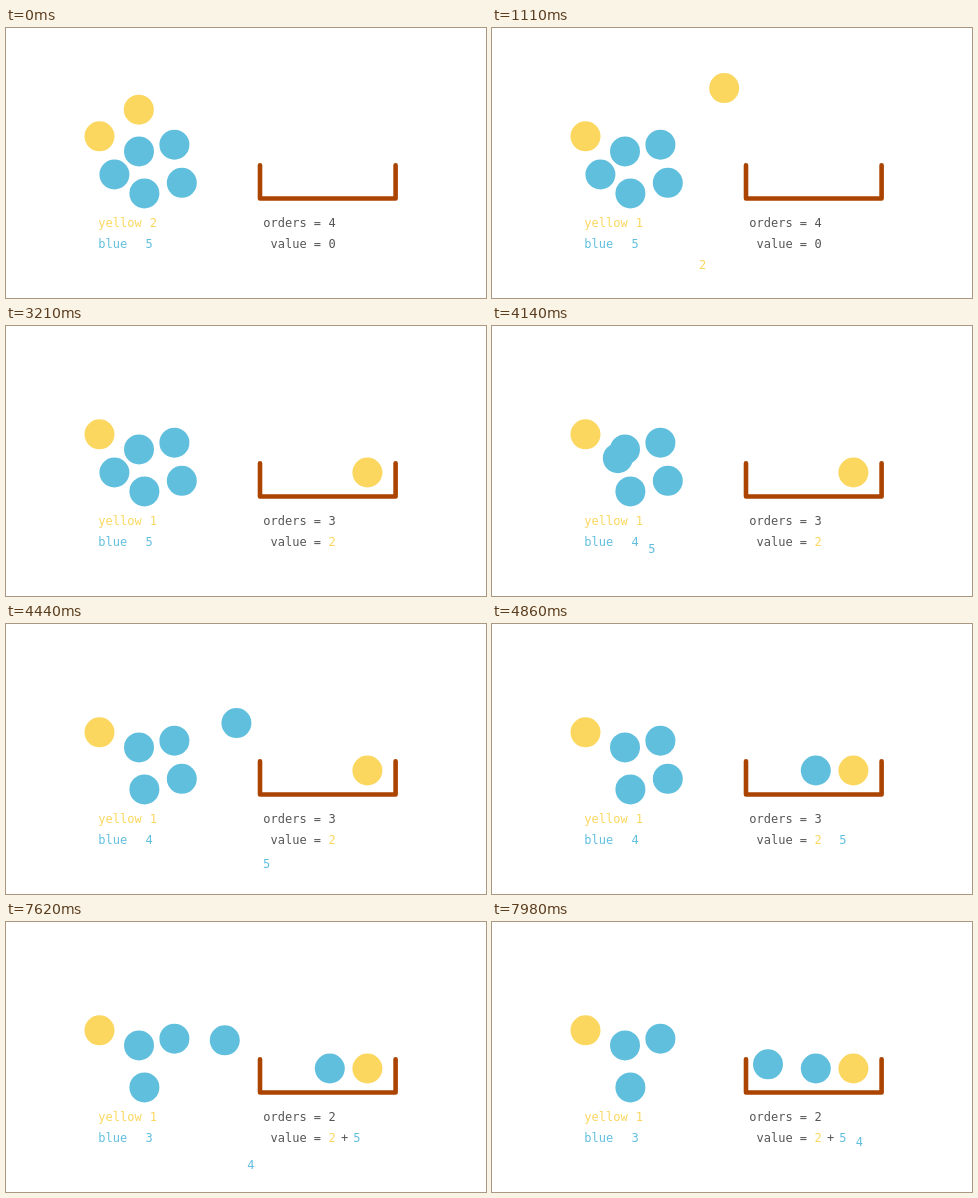
Write an HTML page with a canvas that moves like this. It is 480 by 270 pixels and loops after 8000 ms.

```html
<!DOCTYPE html>
<html lang="en">
<head>
<meta charset="utf-8">
<style>
  html, body { margin: 0; width: 100%; height: 100%; overflow: hidden; background: #fff; }
  canvas { display: block; }
</style>
</head>
<body>
<canvas id="stage" width="480" height="270"></canvas>
<script>
const ctx = document.getElementById('stage').getContext('2d');
const YELLOW = '#fbd75f', BLUE = '#61bfde', BROWN = '#aa4400', INK = '#555';
const LOOP = 8000, MOVE = 900, COUNT_DELAY = 55;
const ROW1 = 198.7, ROW2 = 220.2;

const restingBalls = [
  [93.5, 108.3, YELLOW], [133, 123.4, BLUE], [168.4, 116.7, BLUE], [138.4, 165.4, BLUE]
];

// Each picked ball arcs into the box while its value digit arcs into the sum.
const picks = [
  { start: 720, color: YELLOW, digit: '2',
    ball: { from: [132.8, 81.7], to: [361.4, 146.5], bulge: -51 },
    label: { from: [147.4, ROW1], to: [326, ROW2], bulge: 37 } },
  { start: 3960, color: BLUE, digit: '5',
    ball: { from: [108.4, 146.5], to: [323.8, 146.5], bulge: -48.3 },
    label: { from: [143, ROW2], to: [350.8, ROW2], bulge: 24 } },
  { start: 7200, color: BLUE, digit: '4',
    ball: { from: [175.8, 154.8], to: [280, 146.5], bulge: -33.5 },
    label: { from: [143, ROW2], to: [375.6, ROW2], bulge: 27 } }
];

const clamp = v => Math.min(1, Math.max(0, v));
const progress = (t, start, length) => clamp((t - start) / length);
const easeInOut = p => p < 0.5 ? 2 * p * p : 1 - 2 * (1 - p) ** 2;

// Point on a parabola whose bulge stands perpendicular to the chord.
function arcPoint({ from, to, bulge }, u) {
  const dx = to[0] - from[0], dy = to[1] - from[1];
  const offset = bulge * 4 * u * (1 - u) / Math.hypot(dx, dy);
  return [from[0] + dx * u - dy * offset, from[1] + dy * u + dx * offset];
}

function ball(x, y, color) {
  ctx.fillStyle = color;
  ctx.beginPath();
  ctx.arc(x, y, 15, 0, 2 * Math.PI);
  ctx.fill();
}

function text(str, x, y, color, align = 'center', alpha = 1) {
  ctx.globalAlpha = alpha;
  ctx.fillStyle = color;
  ctx.textAlign = align;
  ctx.fillText(str, x, y);
  ctx.globalAlpha = 1;
}

function drawBox() {
  ctx.strokeStyle = BROWN;
  ctx.lineWidth = 4.6;
  ctx.lineCap = ctx.lineJoin = 'round';
  ctx.beginPath();
  ctx.moveTo(254, 137.3);
  ctx.lineTo(254, 170.5);
  ctx.lineTo(389.6, 170.5);
  ctx.lineTo(389.6, 137.3);
  ctx.stroke();
}

function drawLabels(t) {
  const taken = picks.map(p => t >= p.start + COUNT_DELAY ? 1 : 0);
  text('yellow', 92.3, ROW1, YELLOW, 'left');
  text(2 - taken[0], 147.4, ROW1, YELLOW);
  text('blue', 92.3, ROW2, BLUE, 'left');
  text(5 - taken[1] - taken[2], 143, ROW2, BLUE);

  const first = progress(t, 2850, 360), second = progress(t, 6090, 390);
  text('orders =', 257.3, ROW1, INK, 'left');
  text('4', 326, ROW1, INK, 'center', 1 - first);
  text('3', 326, ROW1, INK, 'center', first * (1 - second));
  text('2', 326, ROW1, INK, 'center', second);
  text('value =', 264.5, ROW2, INK, 'left');
  text('0', 326, ROW2, INK, 'center', 1 - progress(t, 2520, 330));
  text('+', 338.6, ROW2, INK, 'center', second);
}

function draw(t) {
  ctx.fillStyle = '#fff';
  ctx.fillRect(0, 0, 480, 270);
  ctx.font = '12px "DejaVu Sans Mono", monospace';
  drawBox();
  drawLabels(t);
  restingBalls.forEach(b => ball(...b));
  for (const p of picks) {
    const u = easeInOut(progress(t, p.start, MOVE));
    ball(...arcPoint(p.ball, u), p.color);
    if (u > 0) text(p.digit, ...arcPoint(p.label, u), p.color);
  }
}

function tick() {
  draw(performance.now() % LOOP);
  requestAnimationFrame(tick);
}
tick();
</script>
</body>
</html>
```
